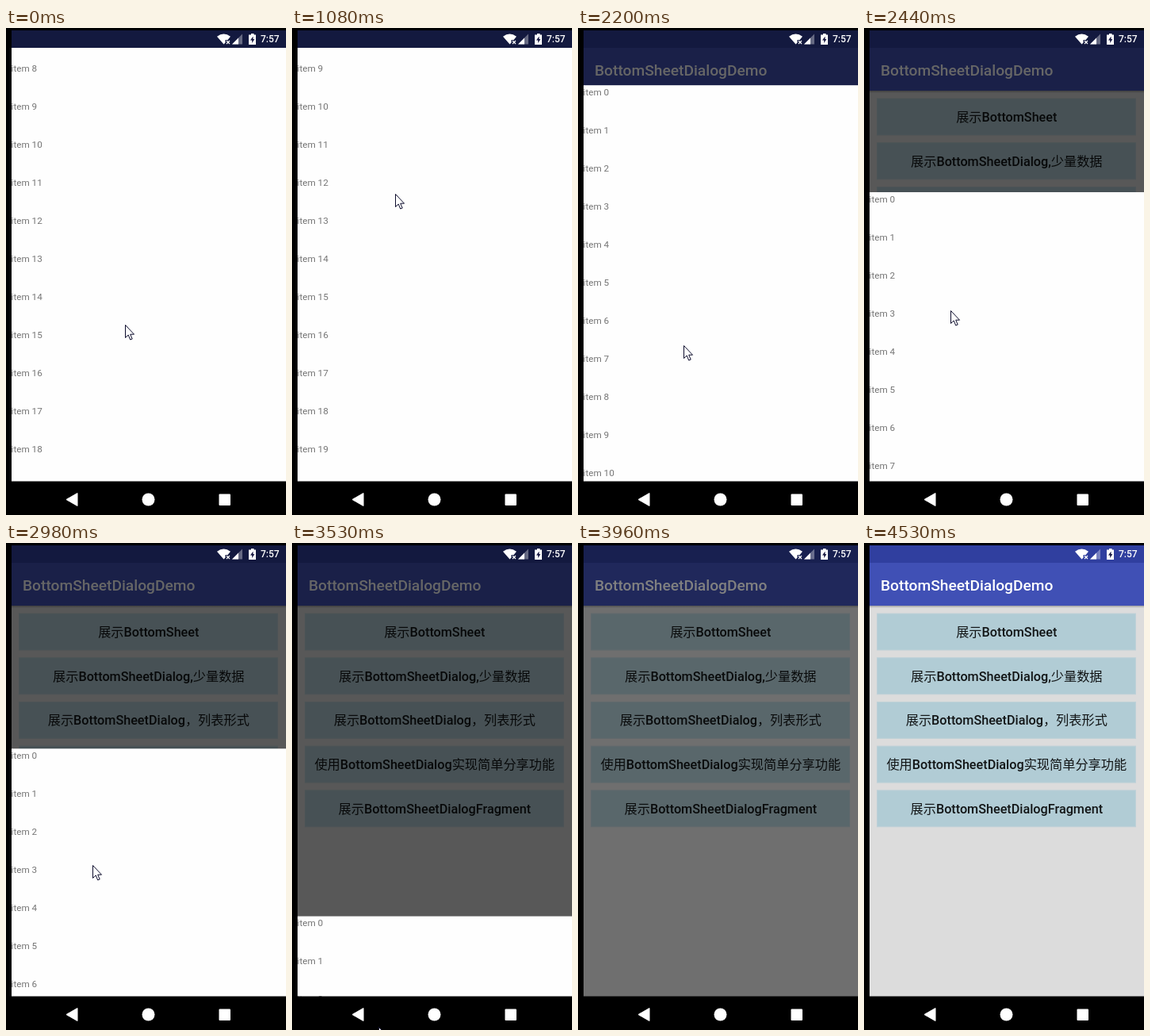
An HTML page for the animation above (5060 ms loop, 353 px wide and 614 px high).

```html
<!DOCTYPE html>
<html lang="zh-CN">
<head>
<meta charset="utf-8">
<title>BottomSheetDialogDemo</title>
<style>
  html, body { margin: 0; width: 100%; height: 100%; overflow: hidden; background: #000; }
  svg { display: block; }
  text { font-family: Roboto, "Noto Sans CJK SC", "Noto Sans CJK", sans-serif; }
  .title { font-size: 19.2px; font-weight: 500; fill: #fff; }
  .btn { font-size: 16.2px; font-weight: 500; fill: #121516; text-anchor: middle; }
  .item { font-size: 11.7px; fill: #757575; }
  .clock { font-size: 12px; font-weight: 500; fill: #fff; }
</style>
</head>
<body>
<svg width="353" height="614" viewBox="0 0 353 614">
  <defs>
    <clipPath id="win"><rect x="7" y="25" width="346" height="547"/></clipPath>
    <linearGradient id="shade" x1="0" y1="0" x2="0" y2="1">
      <stop offset="0" stop-color="#000" stop-opacity=".28"/>
      <stop offset="1" stop-color="#000" stop-opacity="0"/>
    </linearGradient>
  </defs>

  <rect x="7" y="3" width="346" height="569" fill="#dcdcdc"/>
  <rect x="7" y="3" width="346" height="22" fill="#303f9f"/>
  <rect x="7" y="25" width="346" height="54" fill="#4050b5"/>
  <rect x="7" y="79" width="346" height="3" fill="url(#shade)"/>
  <text class="title" x="21" y="59.6">BottomSheetDialogDemo</text>
  <g id="buttons"></g>
  <rect id="dim" x="7" y="3" width="346" height="569"/>

  <g clip-path="url(#win)">
    <rect id="sheet" x="7" width="346" height="560" fill="#fefefe"/>
    <g id="list"></g>
  </g>

  <path d="M0 0H353V3H7V571.4H353V614H0Z"/>
  <g fill="#fff">
    <path d="M76 594.5L90 586.5V602.5Z" stroke="#fff" stroke-linejoin="round"/>
    <circle cx="179.500" cy="594.500" r="8"/>
    <rect x="268.500" y="587.500" width="14.500" height="14.500" rx="1"/>
    <path d="M266 10.700Q274.500 4.500 283 10.700L279.500 15H276.500V18.500L274.500 20.500Z"/>
    <path d="M278 16l4 4m0-4l-4 4" stroke="#fff" stroke-width="1.2"/>
    <path d="M285 20.500L298 7.500V20.500Z" opacity=".35"/>
    <path d="M285 20.500L293 12.500V20.500Z"/>
    <path d="M309 7h3.500v1.500h2.500v12.500h-9v-12.500h3Z"/>
  </g>
  <path d="M311.500 10.500L308 15.500H310.200V19L313.300 14H311.500Z" fill="#15153f"/>
  <text class="clock" x="321" y="18">7:57</text>

  <path id="cursor" d="M.5 .5V16.500L4.200 13L6.700 19L9.200 18L6.700 12.200H11.500Z"
        fill="#fff" stroke="#0c0c2c"/>
</svg>
<script>
const LOOP = 5060;
const STEP = 136.5;
const LEAD = 20;
const PITCH = 48;
const $ = id => document.getElementById(id);

// Key points: [step, value, ...], joined with a soft ease.
const pointer = [[0, 150, 374], [1, 137, 441], [6, 130, 209], [8, 130, 209],
  [10, 141, 415], [13, 120, 254], [15, 141, 415], [18, 109, 356], [19, 109, 356],
  [26, 109, 610], [27, 109, 640], [31, 285, 640], [32, 285, 607], [33, 285, 640]];
const scroll = [[1, 366.5], [2, 414.5], [8, 414.5], [12.3, 111.5], [13, 111.5], [16, 0]];
const sheetTop = [[15, 25], [18, 207], [19, 207], [26, 470.6], [28, 572]];
const dimming = [[28.5, .6], [30.4, 0]];

const ease = u => u * u * (3 - 2 * u);

function along(keys, n) {
  const i = keys.findIndex(k => k[0] > n);
  const a = keys.at(Math.max(i, 0) === i ? Math.max(i - 1, 0) : -1);
  const b = keys.at(i);
  const u = a === b ? 0 : ease((n - a[0]) / (b[0] - a[0]));
  return a.slice(1).map((v, j) => v + (b[j + 1] - v) * u);
}

function add(parent, tag, attrs, label = "") {
  const el = document.createElementNS("http://www.w3.org/2000/svg", tag);
  for (const key in attrs) el.setAttribute(key, attrs[key]);
  el.textContent = label;
  parent.appendChild(el);
}

["展示BottomSheet", "展示BottomSheetDialog,少量数据", "展示BottomSheetDialog，列表形式",
  "使用BottomSheetDialog实现简单分享功能", "展示BottomSheetDialogFragment"
].forEach((label, i) => {
  const y = 89 + i * 55.7;
  add($("buttons"), "rect",
    { x: 16.5, y, width: 326, height: 46, fill: "#b1ccd5", stroke: "#bfd1d8" });
  add($("buttons"), "text", { class: "btn", x: 179.8, y: y + 29 }, label);
});

for (let i = 0; i < 20; i++) {
  add($("list"), "text", { class: "item", x: 6.6, y: 12.5 + i * PITCH }, "item " + i);
}

function draw(time) {
  const n = Math.floor((time + LEAD) / STEP);
  const [x, y] = along(pointer, n).map(Math.round);
  const [top] = along(sheetTop, n);
  const [offset] = along(scroll, n);
  $("cursor").setAttribute("transform", `translate(${x} ${y})`);
  $("sheet").setAttribute("y", top);
  $("list").setAttribute("transform", `translate(0 ${top - offset})`);
  $("dim").setAttribute("opacity", along(dimming, n)[0]);
}

const start = performance.now();
function frame() {
  draw((performance.now() - start) % LOOP);
  requestAnimationFrame(frame);
}
frame();
</script>
</body>
</html>
```
